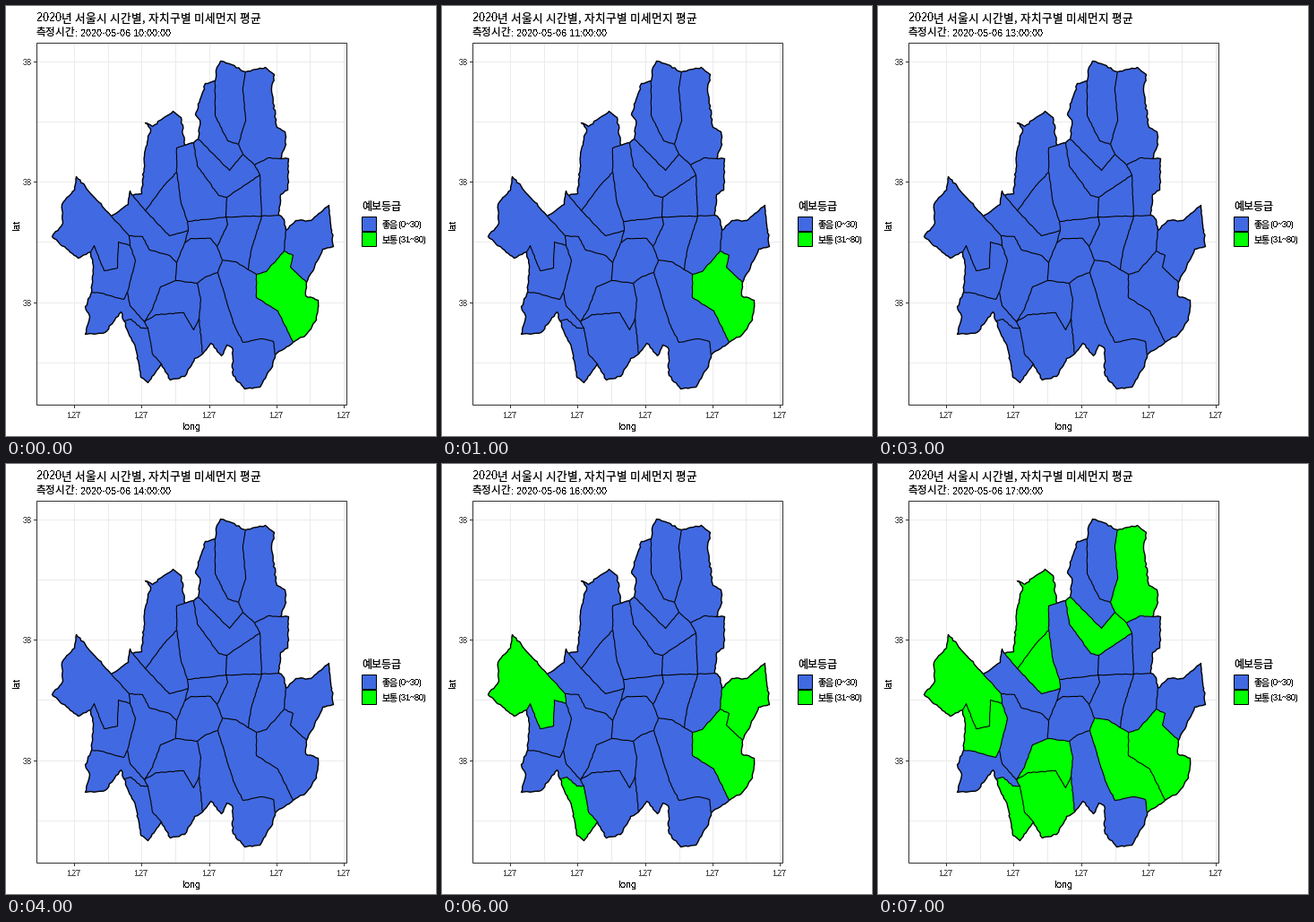
Animation, 480 px wide and 480 px high, one loop 8000 ms. Source, as a matplotlib script:

```python
import math
import random
import matplotlib.pyplot as plt
from matplotlib.animation import FuncAnimation
from matplotlib.patches import Polygon, Rectangle

SIZE, DPI = 480, 80
PX = 72 / DPI  # points per pixel
BLUE, GREEN = "#4169E1", "#00FF00"
GRID, DARK, GREY = "#EBEBEB", "#333333", "#4D4D4D"
ARIAL, HANGUL = "Liberation Sans", "Noto Sans CJK JP"

plt.rcParams.update({"text.hinting": "native", "text.hinting_factor": 1,
                     "path.snap": False})

# Junctions: lower case mostly on the city limit, upper case inside.
NODES = dict(
    a=(267, 73), b=(306, 170), c=(304, 233), d=(312, 250), e=(335, 308),
    f=(320, 375), g=(300, 389), h=(219, 388), i=(173, 399), j=(131, 351),
    k=(95, 319), l=(94, 274), m=(117, 234), n=(141, 211), o=(199, 155),
    p=(209, 152), q=(214, 148), r=(233, 83), s=(310, 273),
    A=(259, 154), B=(264, 165), C=(277, 177), D=(283, 188), E=(246, 213),
    F=(245, 235), G=(285, 234), H=(190, 185), I=(155, 228), J=(202, 240),
    K=(203, 250), L=(199, 264), M=(235, 268), N=(190, 286), O=(137, 256),
    P=(138, 267), Q=(135, 319), R=(154, 352), S=(158, 359), T=(189, 306),
    U=(213, 309), V=(215, 348), W=(241, 283), X=(236, 297), Y=(270, 294),
    Z=(279, 299))

# Each district is a ring of junctions.
DISTRICTS = dict(
    dobong="aAr", nowon="abCBA", gangbuk="rABq", seongbuk="qBCDEp",
    eunpyeong="oHIn", jongno="opEFJH", seodaemun="HJKI", mapo="nIKLNOm",
    jung="JFMLK", yongsan="LMWXUTN", seongdong="FGYWM", dongdaemun="EDGF",
    jungnang="CbcGD", gwangjin="GcdsZY", gangdong="des", songpa="sefZ",
    gangnam="WYZfgX", seocho="XghVU", gwanak="RVhiS", geumcheon="Sij",
    guro="kQRSj", yangcheon="lPQk", gangseo="mOPl", yeongdeungpo="ONTRQP",
    dongjak="TUVR")

# Key bends between two junctions.
LIMIT_BENDS = dict(
    ra=[(235, 68), (239, 61), (249, 64)],
    ab=[(289, 68), (299, 76), (296, 95), (302, 135), (311, 140), (312, 154)],
    bc=[(315, 170), (314, 205), (306, 210)],
    cd=[(310, 238)],
    de=[(323, 239), (340, 239), (360, 222), (365, 268), (353, 271)],
    ef=[(334, 323), (348, 328), (346, 350), (334, 367)],
    gh=[(297, 402), (283, 425), (266, 427), (253, 412), (252, 381), (246, 378),
        (240, 390), (228, 376)],
    hi=[(210, 393), (199, 413), (183, 417)],
    ij=[(158, 420), (150, 414), (144, 381)],
    jk=[(128, 341), (110, 364), (88, 366), (93, 346), (88, 335)],
    kl=[(97, 292)],
    lm=[(80, 281), (51, 257), (63, 242), (62, 221), (76, 205), (78, 190)],
    mn=[(136, 221), (138, 206)],
    no=[(151, 209), (155, 160), (161, 137), (155, 130), (163, 134), (186, 117),
        (195, 124)],
    qr=[(216, 127), (211, 121), (222, 86)])
INNER_BENDS = dict(
    aA=[(264, 90), (267, 128), (263, 140)], rA=[(233, 122), (247, 150)],
    qB=[(249, 183)], Cb=[(292, 169)], DE=[(265, 200)],
    pE=[(213, 178), (237, 211)], oH=[(190, 158)], HI=[(175, 201)],
    HJ=[(195, 220)], IK=[(182, 256)], FM=[(247, 243)],
    LM=[(206, 259), (228, 259)], GY=[(273, 273)],
    ON=[(152, 257), (160, 272), (182, 278)], UX=[(222, 302)],
    WY=[(256, 285)], Zs=[(290, 296)], es=[(317, 291), (320, 278)],
    Zf=[(279, 325), (303, 340)],
    Xg=[(253, 353), (264, 375), (285, 371), (298, 374)], UV=[(217, 328)],
    RV=[(167, 344), (198, 342), (209, 361)], Si=[(163, 388)],
    jS=[(139, 349), (150, 359)], kQ=[(105, 320), (131, 327)],
    QR=[(138, 334)], TR=[(172, 313), (163, 338)], PQ=[(144, 284)],
    lP=[(98, 267), (109, 295), (124, 292), (125, 263)])
BENDS = LIMIT_BENDS | INNER_BENDS

rng = random.Random(25)


def roughen(points, amount):
    """Split a line into short steps and shake the inner points."""
    out = [points[0]]
    for (x0, y0), (x1, y1) in zip(points, points[1:]):
        n = max(1, round(math.hypot(x1 - x0, y1 - y0) / 3))
        for k in range(1, n):
            out.append((x0 + (x1 - x0) * k / n + rng.uniform(-amount, amount),
                        y0 + (y1 - y0) * k / n + rng.uniform(-amount, amount)))
        out.append((x1, y1))
    return out


def ring_edges(ring):
    return [u + v for u, v in zip(ring, ring[1:] + ring[0])]


uses = {}
for ring in DISTRICTS.values():
    for edge in ring_edges(ring):
        key = min(edge, edge[::-1])
        uses[key] = uses.get(key, 0) + 1

lines = {}
for key, count in uses.items():
    bends = BENDS.get(key) or BENDS.get(key[::-1], [])[::-1]
    points = [NODES[key[0]], *bends, NODES[key[1]]]
    points = [(x + 0.5, y + 0.5) for x, y in points]
    lines[key] = roughen(points, 0.8 if count == 1 else 0.4)


def outline(ring):
    points = []
    for edge in ring_edges(ring):
        points += lines[edge] if edge in lines else lines[edge[::-1]][::-1]
    return points


fig = plt.figure(figsize=(SIZE / DPI, SIZE / DPI), dpi=DPI, facecolor="white")
ax = fig.add_axes([0, 0, 1, 1])
ax.set(xlim=(0, SIZE), ylim=(SIZE, 0))
ax.axis("off")


def stroke(xs, ys, color, width=1, z=1):
    ax.plot(xs, ys, color=color, lw=width * PX, zorder=z,
            solid_joinstyle="round", solid_capstyle="butt")


def box(x, y, w, h, fill, edge, z):
    ax.add_patch(Rectangle((x + 0.5, y + 0.5), w, h, fc=fill, ec=edge, lw=PX,
                           zorder=z))


def label(x, y, text, size, font=ARIAL, color="black", ha="left", **kw):
    weight = "light" if font == HANGUL else "normal"
    return ax.text(x, y, text, fontsize=size * PX, family=font, color=color,
                   ha=ha, va=kw.pop("va", "baseline"), weight=weight,
                   antialiased=font == HANGUL, **kw)


# panel
X_TICKS, Y_TICKS = (76, 151, 227, 302, 377), (62, 196, 331)
for x in X_TICKS + (114, 189, 265, 339):
    stroke([x + 0.5] * 2, [41, 446], GRID)
for y in Y_TICKS + (129, 263, 398):
    stroke([34, 380], [y + 0.5] * 2, GRID)
box(34, 41, 346, 404, "none", DARK, 6)
for x in X_TICKS:
    stroke([x + 0.5] * 2, [446, 449], DARK)
    label(x, 460, "127", 9, color=GREY, ha="center")
for y in Y_TICKS:
    stroke([31, 34], [y + 0.5] * 2, DARK)
    label(29, y + 4, "38", 9, color=GREY, ha="right")
label(207, 473, "long", 11, ha="center")
label(17, 244, "lat", 11, ha="right", rotation=90, va="center")

# titles
label(34, 17, "2020", 13)
label(62, 18, "년 서울시 시간별, 자치구별 미세먼지 평균", 12.6, HANGUL)
label(34, 34, "측정시간", 11.5, HANGUL)
clock = label(77, 34, "", 11)

# legend
label(397, 228, "예보등급", 12, HANGUL)
for y, fill, level, span in ((235, BLUE, "좋음", "(0~30)"),
                             (252, GREEN, "보통", "(31~80)")):
    box(397, y, 16, 16, fill, "black", 3)
    label(420, y + 13, level, 9.9, HANGUL)
    label(438, y + 12, span, 9)

# map
patches = {name: ax.add_patch(Polygon(outline(ring), fc=BLUE, ec="none",
                                      zorder=3))
           for name, ring in DISTRICTS.items()}
for key, points in lines.items():
    stroke(*zip(*points), "black", 1.4 if uses[key] == 1 else 1.1, 4)

MORNING = {"songpa"}
AFTERNOON = {"songpa", "gangdong", "gangseo", "geumcheon"}
EVENING = {"songpa", "gangnam", "gangseo", "yangcheon", "geumcheon", "gwanak",
           "dongjak", "eunpyeong", "seodaemun", "seongbuk", "nowon"}
MODERATE = [MORNING] * 3 + [set()] * 3 + [AFTERNOON, EVENING]


def update(hour):
    clock.set_text(f": 2020-05-06 {10 + hour}:00:00")
    for name, patch in patches.items():
        patch.set_facecolor(GREEN if name in MODERATE[hour] else BLUE)
    return [clock, *patches.values()]


anim = FuncAnimation(fig, update, frames=8, interval=1000, repeat=True)
plt.show()
```
